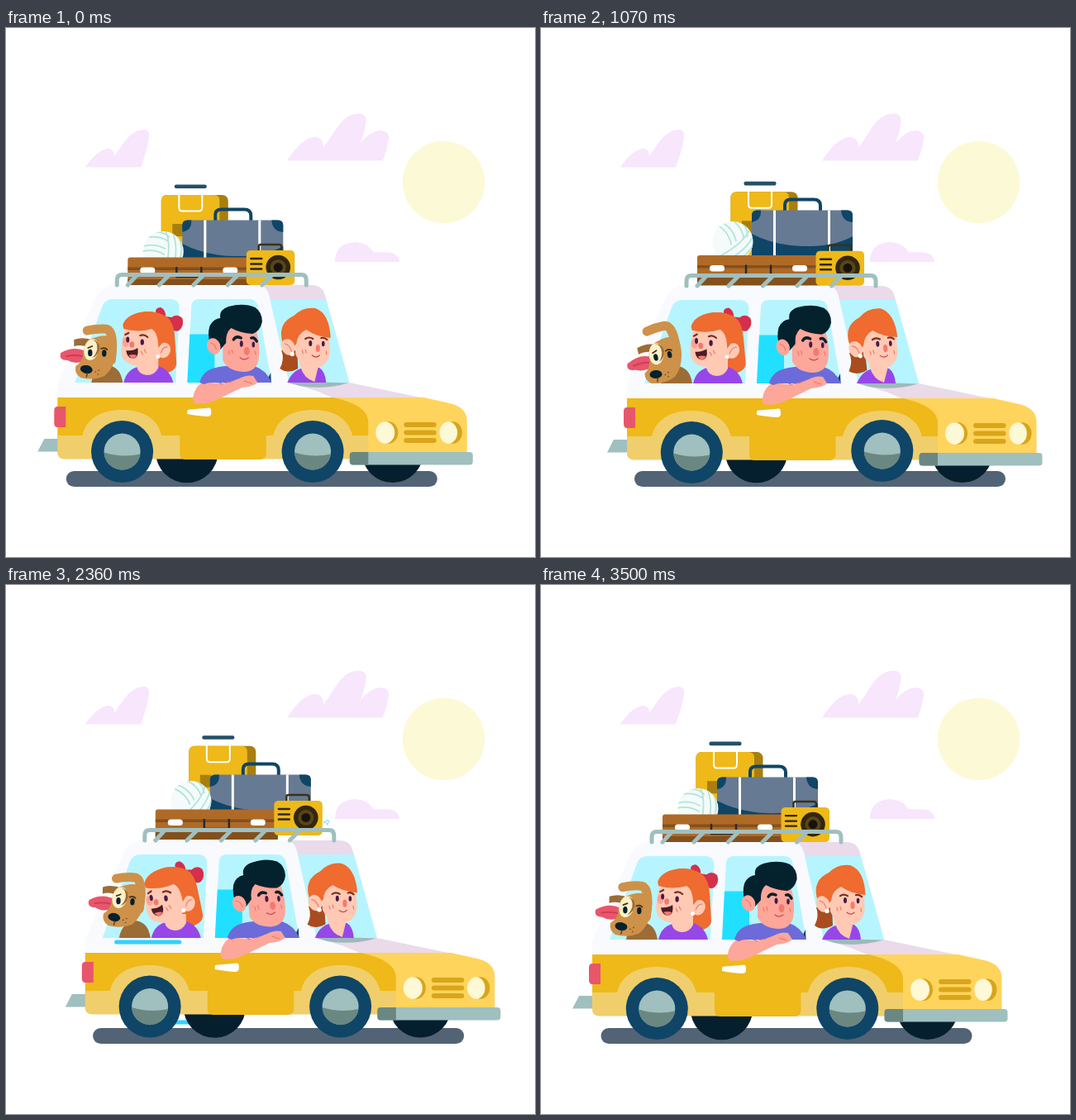
An HTML page for the animation above (3.57 s loop, 640 by 640 pixels).

```html
<!DOCTYPE html>
<html lang="en">
<head>
<meta charset="utf-8">
<title>Road trip</title>
<style>
html, body { margin: 0; width: 100%; height: 100%; overflow: hidden; background: #fff; }
svg { display: block; width: 100vw; height: 100vh; }
.line { fill: none; stroke-linecap: round; stroke-linejoin: round; }
.wind { stroke: #33d0ff; stroke-width: 5; stroke-linecap: round; }
.gold { fill: #eeb919; } .pale { fill: #f0ce6b; } .steel { fill: #a0bfbf; } .slate { fill: #6b8781; }
.navy { fill: #0f4566; } .night { fill: #04212e; } .glass { fill: #b6f5ff; } .lilac { fill: #eadaea; }
.skin { fill: #ffc9b3; } .tan { fill: #fda69a; } .ginger { fill: #ef6b2f; } .violet { fill: #9747e8; }
.coral { fill: #f47a70; } .red { fill: #d42f4b; } .iris { fill: #4a1848; } .fur { fill: #ce914a; } .bark { fill: #9c6c36; }
.crease { fill: none; stroke: #ee7468; stroke-width: 1.1; stroke-linecap: round; }
.brow { fill: none; stroke: #7c2e1d; stroke-width: 2.2; stroke-linecap: round; }
</style>
</head>
<body>
<svg viewBox="0 0 640 640">
<defs>
  <clipPath id="sill"><rect x="0" y="300" width="640" height="129"/></clipPath>
  <clipPath id="ballClip"><circle cx="190" cy="270.500" r="24.500"/></clipPath>
  <g id="tyre">
    <circle r="37.500" class="navy"/><circle r="22" class="steel"/>
    <path class="slate" d="M-22 1Q0 8 21.800 3A22 22 0 0 1-22 1Z"/>
  </g>
  <g id="single">
    <ellipse cx="-1.500" cy="4.500" rx="3.700" ry="3.200"/>
    <path class="line" d="M1.500 4L2.500-7Q4-4 6.500-6" stroke="#4fc8ff" stroke-width="2"/>
  </g>
  <g id="double">
    <circle cx="-8.500" cy="0" r="4.600"/><circle cx="2.500" cy="6.500" r="4.800"/>
    <path d="M-6-1L-2-11 13-6 7 7 5 6 8.500-2-1-5.500-4.500 1Z"/>
  </g>
</defs>

<g fill="#f7e6fc">
  <path d="M96 168.500Q111 146 125 146Q131 147 131 155C141 142 149 123 168 123Q174 124 173 132C171 145 167 158 163 168.500Z"/>
  <path d="M340 160.500Q358 133 373 132Q384 132 384 144C396 132 404 104 426 103.500Q437 104 435.500 114Q434 126 429 139Q440 125 453 124Q464 125 463 134Q461 147 456 160.500Z"/>
  <path d="M398 283Q398 260 423 259Q438 260 445 271.500H462Q475 272 476 283Z"/>
</g>
<circle cx="529.500" cy="186.500" r="49.700" fill="#fcf9d6"/>
<rect id="shadow" x="72.500" y="536" width="449" height="19" rx="9.500" fill="#526375"/>
<g id="windBack"></g>

<g id="farWheels" fill="#051f2e"><circle cx="218.500" cy="512.500" r="37.800"/><circle cx="467.500" cy="512.500" r="37.500"/></g>

<g id="yellowCase">
  <rect x="187.500" y="202" width="81" height="80" rx="7" fill="#a87f0e"/>
  <path class="gold" d="M194.500 202H251Q258 202 258 209V282H187.500V209Q187.500 202 194.500 202Z"/>
  <path d="M201 237H214V252H201Z" fill="#a87f0e"/>
  <path class="line" d="M209 201V217Q209 221.500 213 221.500H233Q237 221.500 237 217V201" stroke="#fff" stroke-width="2"/>
  <rect x="203.500" y="189.500" width="39" height="4.600" rx="2" fill="#254f69"/>
</g>
<g id="blueCase">
  <path class="line" d="M253 233V226Q253 219.500 260 219.500H288Q296 219.500 296 227V233" stroke="#0f4566" stroke-width="4"/>
  <rect x="213" y="232.500" width="122" height="57" rx="6" fill="#667a93"/>
  <path class="navy" d="M213 247V238.500Q213 232.500 219 232.500H224Q225 245 213 247ZM335 247V238.500Q335 232.500 329 232.500H321Q322 246 335 247ZM213 261Q240 275 274 276Q312 277 335 264V289.500H213Z"/>
  <path d="M240.500 232.500V289M306.500 232.500V289" stroke="#fff" stroke-width="3"/>
</g>
<g id="ball">
  <circle cx="190" cy="270.500" r="24.500" fill="#f4fbfa"/>
  <g class="line" clip-path="url(#ballClip)" stroke="#b2e4da" stroke-width="1.800">
    <path d="M166 264Q180 260 192 267M165 270Q180 267 191 274M172 253Q186 251 196 258M193 246Q200 262 193 292M201 247Q209 264 202 292M209 254Q215 267 209 284M180 247Q190 246 197 253"/>
  </g>
</g>
<g id="brownCase">
  <rect x="147" y="277.500" width="148" height="36" rx="3" fill="#b06a27"/>
  <path d="M147 289.500H295V293H147ZM147 304H295V314H147Z" fill="#83501d"/>
  <path class="line" d="M206 290V301H236V290" stroke="#2b2a2e" stroke-width="2.500"/>
  <rect x="162" y="289.500" width="18" height="7.500" rx="3.500" fill="#fff"/><rect x="262" y="289.500" width="18" height="7.500" rx="3.500" fill="#fff"/>
</g>
<g id="radio">
  <path class="line" d="M305.500 269V264Q305.500 262 308 262H330Q333 262 333 265V269" stroke="#3a3216" stroke-width="2.500"/>
  <rect x="290.500" y="269" width="58.500" height="42" rx="5" class="gold"/>
  <path class="line" d="M296 279H309M296 285.500H309M296 291.500H309" stroke="#32270f" stroke-width="2.400"/>
  <circle cx="329" cy="289.500" r="14.800" fill="#32270f"/><circle cx="329" cy="289.500" r="9.500" fill="#59451b"/><circle cx="329" cy="289.500" r="5.500" fill="#17130a"/>
</g>

<g id="car">
  <path class="steel" d="M46 497H64V512.500H38Z"/>
  <path d="M62 448V430L107 329Q115 311 130 311H330V448Z" fill="#f9fafe"/>
  <path class="lilac" d="M309 311H370Q381 311 385 321L415 429 506 448H300L343 429 319 327Q316 314 309 311Z"/>
  <path d="M319 328 309 311H300L322 429 300 430V448H397L375 439 343 429Z" fill="#f9fafe"/>
  <path class="gold" d="M62 447H440V513H62Z"/>
  <path class="pale" d="M62 493H92C97 472 115 462 140 462S183 472 188 493H323C328 472 346 462 371 462S414 472 419 493H440V521.500H70Q62 521 62 514Z"/>
  <path class="gold" d="M210 470H314.500V515Q314 522 307 522H217Q210 522 210 515Z"/>
  <path d="M396 447H505L534 453.500Q557 458 557.500 475V513H438V476Q437 456 396 447Z" fill="#ffd45c"/>
  <rect x="415.500" y="513" width="149" height="15.500" rx="4" class="steel"/>
  <path class="slate" d="M438 513H419.500Q415.500 513 415.500 517V524.500Q415.500 528.500 419.500 528.500H438Z"/>
  <g fill="#d7a51a"><ellipse cx="463" cy="489.500" rx="11" ry="13.200"/><ellipse cx="540.500" cy="489.500" rx="11" ry="13.200"/></g>
  <g fill="#fdf8d5"><ellipse cx="458.500" cy="489.500" rx="11.500" ry="13.200"/><ellipse cx="535" cy="489.500" rx="10.800" ry="13.200"/></g>
  <path class="line" d="M484 480H517.500M484 489.500H517.500M484 499H517.500" stroke="#d9a61a" stroke-width="6"/>
  <path d="M72 458V483H62Q58 483 58 478V463Q58 458 62 458Z" fill="#e8566b"/>
  <path d="M219 465Q218 461 223 461.500L246 459.500Q248 460 248 464V467Q247 470 243 470Q229 469 219 467Z" fill="#fff"/>
  <path class="glass" d="M83 429 116 337Q119 328 130 328H200Q209 329 209.500 338L205 429Z"/>
  <path class="glass" d="M219 429 224 336Q225 328 233 328H294Q302 328 304.500 336L321 429Z"/>
  <path d="M222 370.500H252V429H219Z" fill="#21e0ff"/>
  <path class="glass" d="M319 328H387L415 429H342Z"/>
  <path d="M341 429Q380 428 414 429.500Q385 438 355 433Z" fill="#9dbabb"/>
  <path class="navy" d="M314 429 320 417 320.500 429Z"/>

  <g clip-path="url(#sill)">
    <path class="bark" d="M103 429Q106 411 122 408Q138 409 141 429Z"/>
    <g id="dog">
      <path d="M96 391Q82 384 66 393Q63 402 74 402Q84 408 97 402Z" fill="#e8566b"/>
      <path class="line" d="M73 397Q83 395 92 397" stroke="#c93d59" stroke-width="1.800"/>
      <path class="bark" d="M82 377Q94 373 105 378L102 387Q91 382 82 385Z"/>
      <path class="line" id="ear" d="M127 402Q132 364 119 364Q109 363.500 98 366" stroke="#ce914a" stroke-width="11" stroke-linecap="butt"/>
      <path class="fur" d="M99 378Q116 369 130 374Q135 377 133.500 391Q131 411 119 421Q105 427 90 423Q82 418 84 409Q91 405 93 396Q94 383 99 378Z"/>
      <ellipse cx="103" cy="389" rx="9" ry="13" fill="#fcf1c6" transform="rotate(12 103 389)"/>
      <path class="bark" d="M104 377Q111 379 110 389Q108 396 104 399Q111 397 113 388Q113 378 104 377Z"/>
      <ellipse class="night" cx="101.500" cy="393" rx="2.700" ry="4.200"/><ellipse class="night" cx="118.500" cy="393.500" rx="2.700" ry="4.200"/>
      <path class="line" d="M99 387L104 385M115 388Q119 386 122 389" stroke="#4c3119" stroke-width="1.800"/>
      <ellipse class="night" cx="97" cy="413" rx="7.500" ry="5" transform="rotate(10 97 413)"/>
      <path class="line" d="M98 418L97 422M108 416V416.100M112 414V414.100M111 419V419.100" stroke="#63401d" stroke-width="1.500"/>
    </g>

    <g id="girl">
      <path class="red" d="M182 349Q178 338 187 338Q193 341 193 349L200 350Q207 345 213 351Q216 360 209 366Q202 369 198 360Z"/>
      <path class="ginger" d="M150 349Q172 337 194 349Q203 356 204 374L206 406Q205 416 190 418Q178 410 170 390Z"/>
    </g>
    <path class="violet" d="M142 429Q146 411 164 409H184Q198 413 202 429Z"/>
    <path class="skin" d="M161 400H184V411Q180 420 170 420Q160 419 158 410Z"/>
    <g id="girlFace">
      <path class="skin" d="M145 359Q140 376 139 390Q139 403 150 407Q166 412 179 404Q188 395 189 361Z"/>
      <ellipse class="skin" cx="190.500" cy="390" rx="8" ry="9.500" transform="rotate(25 190.500 390)"/>
      <path class="crease" d="M187 393Q190 385 195 386M163 391L165 395M167 389L169 393"/>
      <path class="ginger" d="M141 359Q146 345 169 343Q196 343 200 364L202 382Q191 375 188 382L184 387Q184 369 176 364Q160 369 142 364Z"/>
      <ellipse cx="144.500" cy="380" rx="4" ry="6" fill="#ffa192"/>
      <ellipse class="coral" cx="152" cy="383" rx="3" ry="3.700"/>
      <ellipse class="iris" cx="147" cy="377" rx="2" ry="3.500"/><ellipse class="iris" cx="164.500" cy="380" rx="2.200" ry="3.600"/>
      <path class="brow" d="M144 371L148 369M162 372Q167 370 171 374"/>
      <path d="M145 390Q153 391 159 387Q161 399 153 400Q146 399 145 390Z" fill="#501b25"/>
      <path class="coral" d="M148 396Q153 394 158 396Q156 400 152 400Z"/>
      <circle cx="183.500" cy="397.500" r="2.500" fill="#fff"/>
    </g>

    <path d="M234 429Q241 411 265 409H300Q315 414 321 429Z" fill="#6c6bd9"/>
    <g id="man">
      <path class="tan" d="M262 363Q282 360 303 368Q308 385 305 403Q301 416 287 416Q268 415 262 402Z"/>
      <path class="night" d="M247 384Q243 372 246 361Q250 352 259 351Q257 341 269 337Q287 332 301 338Q310 344 309.500 356Q307 367 298 370Q283 369 272 363Q265 369 266 381L259 389Z"/>
      <ellipse class="tan" cx="251" cy="385" rx="8" ry="10" transform="rotate(-20 251 385)"/>
      <path class="crease" d="M247 381Q253 382 254 389M269 390L270 395M273 389L274 394M301 391L302 395"/>
      <ellipse class="iris" cx="284.500" cy="382" rx="2" ry="3.700"/><ellipse class="iris" cx="299" cy="383" rx="1.800" ry="3.500"/>
      <path class="line" d="M275 377Q278 372 284 375M296.500 375Q300 373.500 303 379" stroke="#04212e" stroke-width="3.400"/>
      <ellipse class="coral" cx="291" cy="391" rx="3.500" ry="5"/>
      <path class="line" d="M283 399Q288 403 293 399" stroke="#c44b54" stroke-width="1.300"/>
    </g>

    <g id="womanBack"><path d="M333 390Q337 401 331 412Q340 419 353 412L352 390Z" fill="#a94c20"/></g>
    <path class="violet" d="M340 429Q347 412 362 411H379Q386 416 387 429Z"/>
    <path class="skin" d="M354 400H378L377 412 373 428Q360 424 356 410Z"/>
    <g id="woman">
      <path class="skin" d="M348 364Q368 356 391 372L391.500 394Q388 410 375 411Q356 409 350 395Z"/>
      <path class="ginger" d="M334 380Q328 357 348 348Q359 337 374 339Q391 345 392.500 375Q374 373 363 365Q352 370 351 382L345 389Z"/>
      <ellipse class="skin" cx="341" cy="386" rx="8" ry="10" transform="rotate(-22 341 386)"/>
      <path class="crease" d="M337 382Q343 383 345 391M358 390L359 394M362 389L363 393M387 391L387.500 395"/>
      <g id="eyes"><ellipse class="iris" cx="368" cy="381.500" rx="2" ry="3.500"/><ellipse class="iris" cx="383.500" cy="382" rx="1.800" ry="3.300"/></g>
      <path class="brow" d="M362 376Q366 373 371 376M381 375Q385 374 388 377"/>
      <ellipse class="coral" cx="377" cy="387.500" rx="2.600" ry="4.600"/>
      <path class="line" d="M370 396Q375 400 379 396" stroke="#c44b54" stroke-width="1.300"/>
      <circle cx="346" cy="394.500" r="2.700" fill="#fff"/>
    </g>
  </g>
  <path class="tan" d="M226 447Q228 433 239 428L264 431 282 424Q291 419 299 421L304 429Q299 434 285 435L252 451Q239 456 229 454.500Q225 452 226 447Z"/>
  <path d="M234 429Q238 412 260 410Q270 418 260 430Q248 427 239 431Z" fill="#6c6bd9"/>
  <path class="crease" d="M288 427L297 430M259 431L272 428"/>
  <path class="line" d="M134 311V305Q134 298.500 140 298.500H357Q363 298.500 363 305V311M158 299L147 311M197 299L185 311M238.500 299L226.500 311M280 299L268 311M321.500 299L309.500 311" stroke="#a0bfbf" stroke-width="5" stroke-linecap="butt"/>
</g>
<use href="#tyre" id="rearWheel"/><use href="#tyre" id="frontWheel"/>
<g id="windFront"></g>
<g id="notes" fill="#4fc8ff"></g>
</svg>

<script>
const LOOP = 3570;
const NS = "http://www.w3.org/2000/svg";
const $ = id => document.getElementById(id);
const ease = p => { p = Math.min(1, Math.max(0, p)); return p * p * (3 - 2 * p); };

// Vertical bounces and head tilts at shared key times
const KEYS = [0, 300, 570, 760, 1070, 1640, 2130, 2360, 2600, 2930];
const tracks = {
  car: [0, -.5, -4.5, -4.5, 1, .7, 0, -2, -4.5, .2],
  rear: [0, -1, -6, -3, 1, 1, 0, -2.5, -4, -1],
  front: [0, 0, -4.5, -6, -1, 1, 0, -2.5, -4, -1],
  yellowCase: [0, -1, -7, -13, -3.7, 1, -1, -7.3, -12.3, -.2],
  blueCase: [0, -.5, -5, -9, -12, 1, 0, -3, -11, .2],
  ball: [0, -.5, -5, -8, -12, 1, -1, -9, -11, -2],
  brownCase: [0, -1, -5, -8, -2.5, .7, 0, -6, -8, -.3],
  radio: [0, -1, -7.7, -10, .8, .8, -1, -8, -9, 0],
  girl: [0, -2, -5.5, -6, -1.5, 0, -5, -8, -5, 1],
  man: [0, -1, -4, -4, -.5, -.7, -3, -5, -3, 0],
  woman: [0, 0, -.5, -1, -4, -6, -4, -1.5, 0, .5],
  dogTilt: [0, -5, -12, -14, -13, -1, 1, 2, 6, 9],
  dogLift: [0, -2, -3.5, 0, 5, 0, -5, -9, -8, -2],
  earLift: [0, -4, -9, -9, -6, -4, 0, 0, -4, -9]
};

// Smooth periodic curve through a track
function sample(name, t) {
  const v = tracks[name], n = KEYS.length;
  const time = i => KEYS[(i + n) % n] + LOOP * Math.floor(i / n);
  const val = i => v[(i + n) % n];
  const slope = i => (val(i + 1) - val(i - 1)) / (time(i + 1) - time(i - 1));
  let i = n - 1;
  while (KEYS[i] > t) i--;
  const d = time(i + 1) - time(i), p = (t - time(i)) / d, e = ease(p), q = 1 - p;
  return val(i) * (1 - e) + val(i + 1) * e + d * p * q * (q * slope(i) - p * slope(i + 1));
}

// Wind streaks: right end, height, start time, drawn behind the car or not
const streaks = [
  [337, 529, 51], [213, 432, 119], [592, 409, 385], [202, 501, 1121], [337, 322, 1556],
  [337, 529, 2020, true], [213, 432, 2170], [592, 409, 2706], [202, 501, 2706]
].map(([x, y, start, back]) => {
  const el = document.createElementNS(NS, "line");
  el.setAttribute("class", "wind");
  el.setAttribute("y1", y);
  el.setAttribute("y2", y);
  $(back ? "windBack" : "windFront").append(el);
  return { el, x, start };
});

const notes = [
  ...[280, 1470, 2660].map(start => ["single", start, 450]),
  ...[430, 1190, 1620, 2300, 2810].map(start => ["double", start, 600])
].map(([kind, start, life]) => {
  const el = document.createElementNS(NS, "use");
  el.setAttribute("href", "#" + kind);
  $("notes").append(el);
  return { el, kind, start, life };
});

const move = (id, x, y, more = "") => $(id).setAttribute("transform", `translate(${x} ${y}) ${more}`);
const turn = (id, angle, x, y) => $(id).setAttribute("transform", `rotate(${angle} ${x} ${y})`);

function drawStreak({ el, x, start }, t) {
  const age = t - start;
  const on = age > 0 && age < 575;
  el.style.display = on ? "" : "none";
  if (!on) return;
  el.setAttribute("x1", x - 2.5 - 165 * ease(age / 400));
  el.setAttribute("x2", x - 2.5 - 165 * ease((age - 175) / 400));
}

function drawNote({ el, kind, start, life }, t, dx, dy) {
  const p = (t - start) / life;
  const on = p > 0 && p < 1;
  el.style.display = on ? "" : "none";
  if (!on) return;
  const one = kind === "single";
  const x = one ? 334 + 24 * p : 350 + 40 * p;
  const y = one ? 280 - 55 * Math.sqrt(p) : 290 - 90 * p * p;
  const size = one ? Math.min(1, 3 * p) : .2 + p;
  el.setAttribute("transform", `translate(${x + dx} ${y + dy}) scale(${size})`);
  el.setAttribute("opacity", Math.min(1, 6 * p) * Math.min(1, (one ? 4 : 2) * (1 - p)));
}

function draw(t) {
  const forth = ease((t + 70) / 1600), back = ease((t - 1600) / 1890);
  const drive = t < 3500 ? forth - back : ease((t - 3500) / 1600);
  const x = 52.5 * drive;
  const at = name => sample(name, t);
  const y = at("car"), rear = at("rear"), front = at("front");

  move("shadow", 50.6 * drive, 0);
  move("car", x, y);
  for (const id of ["yellowCase", "blueCase", "brownCase", "radio"]) move(id, x, at(id));
  move("ball", x, at("ball"), `rotate(${-4 * at("ball")} 190 270.5)`);
  move("farWheels", x, (rear + front) / 2);
  move("rearWheel", 140.3 + x, 512.5 + rear);
  move("frontWheel", 370.8 + x, 512.5 + front);

  for (const id of ["girl", "girlFace"]) turn(id, at("girl"), 170, 415);
  turn("man", at("man"), 280, 415);
  for (const id of ["woman", "womanBack"]) turn(id, at("woman"), 362, 420);
  move("dog", 0, at("dogLift"), `rotate(${at("dogTilt")} 97 413)`);
  move("ear", 0, at("earLift"));
  const blink = Math.abs(t - 1640) < 90 ? .2 : 1;
  move("eyes", 0, 382 * (1 - blink), `scale(1 ${blink})`);

  streaks.forEach(s => drawStreak(s, t));
  notes.forEach(n => drawNote(n, t, x, y));
}

const begin = performance.now();
function tick() {
  draw((performance.now() - begin) % LOOP);
  requestAnimationFrame(tick);
}
tick();
</script>
</body>
</html>
```
